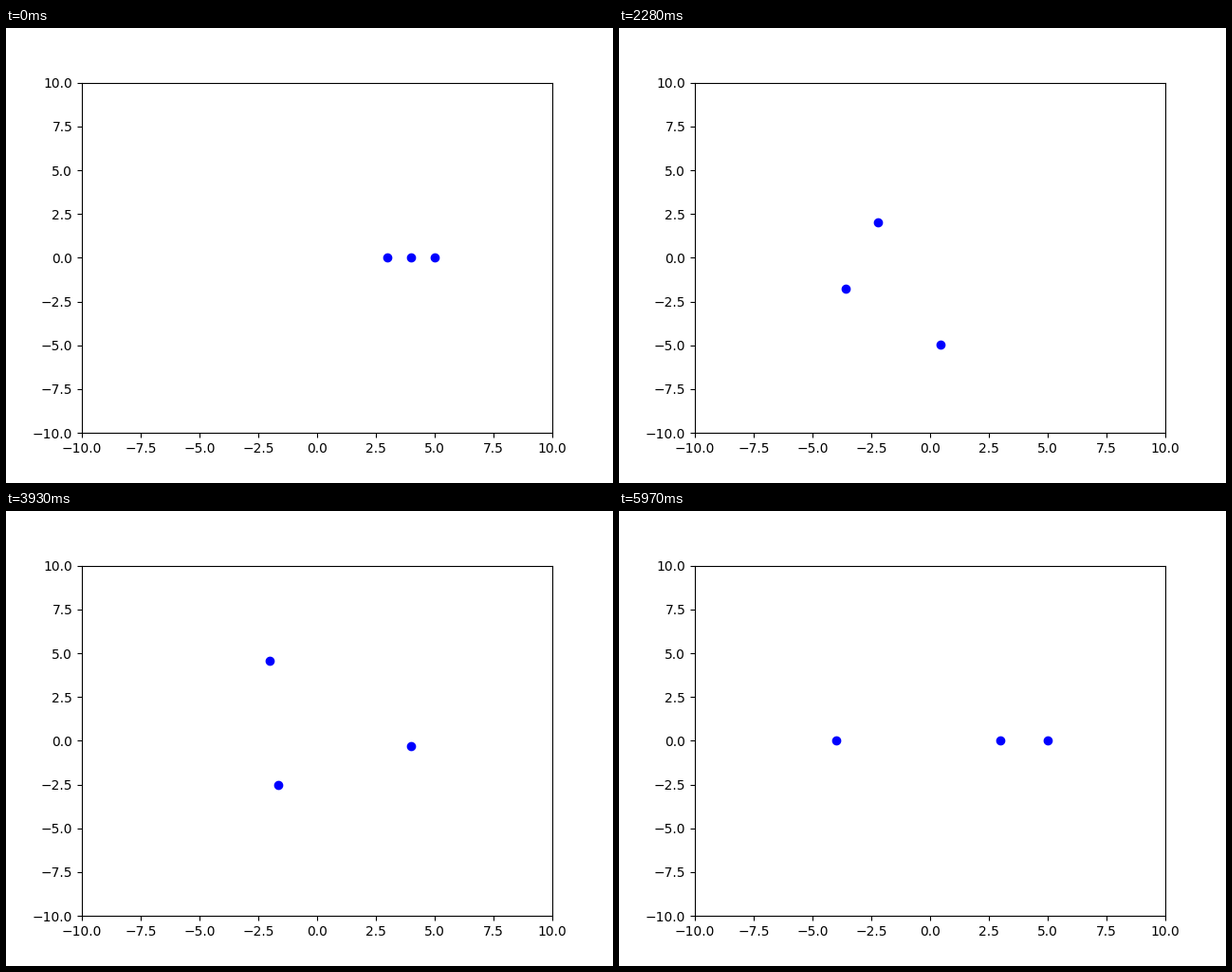
Write a matplotlib script that moves like this. It is 640 px wide and 480 px high and loops after 6000 ms.

```python
import numpy as np
import matplotlib.pyplot as plt
from matplotlib.animation import FuncAnimation

FRAMES = 200
INTERVAL = 30  # ms

radii = np.array([3, 4, 5])
turns = np.array([1, 1.5, 2])  # revolutions per loop

fig, ax = plt.subplots(figsize=(6.4, 4.8), dpi=100)
ax.set_xlim(-10, 10)
ax.set_ylim(-10, 10)
dots, = ax.plot([], [], "bo")


def update(frame):
    angle = 2 * np.pi * turns * frame / (FRAMES - 1)
    dots.set_data(radii * np.cos(angle), radii * np.sin(angle))
    return dots,


anim = FuncAnimation(fig, update, frames=FRAMES, interval=INTERVAL,
                     repeat=True, repeat_delay=0)
plt.show()
```
